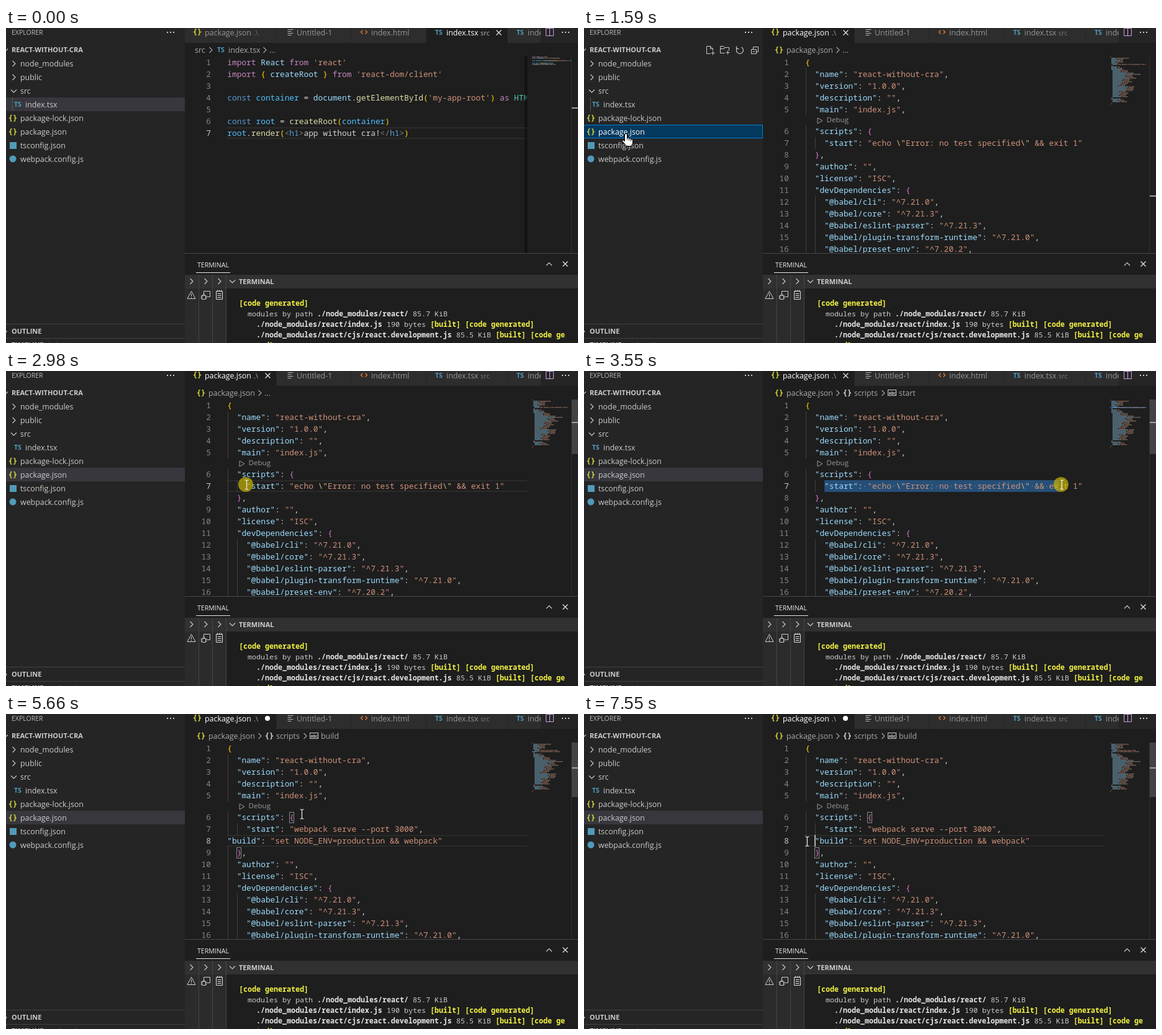
Recreate the animation shown at these times as an HTML page with a canvas. Size 921 by 508 pixels, loop 8000 ms.

```html
<!DOCTYPE html>
<html lang="en">
<head>
<meta charset="utf-8">
<title>Editor walkthrough</title>
<style>
  html, body { margin: 0; width: 100%; height: 100%; overflow: hidden; background: #1e1e1e; }
  canvas { display: block; }
</style>
</head>
<body>
<canvas id="stage" width="921" height="508"></canvas>
<script>
const ctx = document.getElementById('stage').getContext('2d');
const LOOP = 8000;
const UI = '"Open Sans", "Noto Sans", sans-serif';
const MONO = '"Noto Sans Mono", "DejaVu Sans Mono", monospace';
const CODE_X = 356.3, CELL = 7.697, LINE = 19, TOP = 46, LENS = 16;
const YELLOW = '#cbcb41', BLUE = '#519aba', ORANGE = '#e37933', GREY = '#cccccc';

// ---- documents ----
const tsx = [
  "import React from 'react'",
  "import { createRoot } from 'react-dom/client'",
  "",
  "const container = document.getElementById('my-app-root') as HTMLElement",
  "",
  "const root = createRoot(container)",
  "root.render(<h1>app without cra!</h1>)"
];
const dep = s => {
  const [name, version] = s.split(' ');
  return `    "${name}": "^${version}",`;
};
const head = [
  '{', '  "name": "react-without-cra",', '  "version": "1.0.0",', '  "description": "",',
  '  "main": "index.js",', '  "scripts": {'
];
const tail = [
  '  },', '  "author": "",', '  "license": "ISC",', '  "devDependencies": {',
  ...['@babel/cli 7.21.0', '@babel/core 7.21.3', '@babel/eslint-parser 7.21.3',
    '@babel/plugin-transform-runtime 7.21.0', '@babel/preset-env 7.20.2',
    '@babel/preset-react 7.18.6', '@babel/preset-typescript 7.21.0', '@babel/runtime 7.21.0',
    '@types/react 18.0.28', '@types/react-dom 18.0.11', 'babel-loader 9.1.2',
    'css-loader 6.7.3', 'eslint 8.36.0', 'eslint-config-prettier 8.7.0',
    'eslint-plugin-react 7.32.2', 'eslint-webpack-plugin 4.0.0', 'html-webpack-plugin 5.5.0',
    'prettier 2.8.4', 'style-loader 3.3.2', 'typescript 4.9.5', 'webpack 5.76.2',
    'webpack-cli 5.0.1'].map(dep),
  '  },', '  "dependencies": {', dep('react 18.2.0'), dep('react-dom 18.2.0'), '  }', '}'
];
const build = '"build": "set NODE_ENV=production && webpack"';
const before = [...head, '    "start": "echo \\"Error: no test specified\\" && exit 1"', ...tail];
const pasted = [...head, '    "start": "webpack serve --port 3000",', build, ...tail];
const indented = pasted.map(s => s === build ? '  ' + s : s);

const jsonRules = [
  [/"[^"]*"(?=:)/y, '#9cdcfe'], [/\\"/y, '#d7ba7d'],
  [/"[^"\\]*"?|(?<=\\")[^"\\]*"?/y, '#ce9178'], [/[{}]/y, 'brace']
];
const tsxRules = [
  [/'[^']*'/y, '#ce9178'], [/(import|from|as)\b/y, '#c586c0'], [/const\b/y, '#569cd6'],
  [/createRoot(?= })|React|document/y, '#9cdcfe'],
  [/createRoot|getElementById|render/y, '#dcdcaa'], [/container|root/y, '#4fc1ff'],
  [/HTMLElement/y, '#4ec9b0'], [/app without cra!/y, '#d4d4d4'],
  [/<\/?|>/y, '#808080'], [/h1/y, '#569cd6'], [/[{}()]/y, 'brace']
];
const indentOf = s => s.search(/\S|$/);

function tokenize(line, rules) {
  const out = [];
  for (let col = 0; col < line.length;) {
    let text = line[col], color = '#d4d4d4';
    for (const [re, c] of rules) {
      re.lastIndex = col;
      const m = re.exec(line);
      if (m && m[0]) { text = m[0]; color = c; break; }
    }
    if (color === 'brace') color = indentOf(line) ? '#da70d6' : '#ffd700';
    if (text !== ' ') out.push({ text, color, col });
    col += text.length;
  }
  return out;
}
const makeDoc = (lines, rules, json) => ({ lines, json, tokens: lines.map(l => tokenize(l, rules)) });
const docs = {
  tsx: makeDoc(tsx, tsxRules, false), before: makeDoc(before, jsonRules, true),
  pasted: makeDoc(pasted, jsonRules, true), indented: makeDoc(indented, jsonRules, true)
};

// ---- pointer: start time, x, y, kind ----
const pointer = [
  [0, -50, -50, 'arrow'], [330, 905, 402, 'arrow'], [410, 420, 320, 'beam'], [490, 72, 208, 'hand'],
  [660, 70, 203, 'hand'], [740, 69, 191, 'hand'], [820, 68, 173, 'hand'], [990, 67, 170, 'hand'],
  [1670, 82, 168, 'hand'], [1750, 210, 156, 'hand'], [1840, 400, 140, 'beam'], [1920, 481, 135, 'beam'],
  [2080, 474, 140, 'beam'], [2160, 455, 152, 'beam'], [2240, 432, 164, 'beam'],
  [2320, 411, 175, 'beam'], [2400, 397, 182, 'beam'], [2480, 390, 184, 'beam'],
  [2650, 389, 183, 'beam'], [2900, 387, 183, 'beam'], [3060, 405, 183, 'beam'],
  [3140, 445, 183, 'beam'], [3220, 505, 183, 'beam'], [3310, 572, 183, 'beam'],
  [3390, 645, 183, 'beam'], [3470, 715, 183, 'beam'], [3550, 769, 183, 'beam'],
  [3650, 785, 183, 'beam'], [3720, 798, 183, 'beam'], [3800, 810, 183, 'beam'],
  [3900, 817, 183, 'beam'], [4320, 817, 190, 'beam'], [4490, 816, 183, 'beam'],
  [5660, 476, 161, 'beam'], [5740, 444, 183, 'beam'], [5910, 420, 193, 'beam'],
  [5990, 391, 201, 'beam'], [6070, 365, 205, 'beam'], [6150, 350, 203, 'arrow'],
  [6230, 346, 202, 'arrow'], [6710, 352, 203, 'arrow'], [6790, 359, 205, 'beam']
];
const at = (table, t) => table.reduce((hit, row) => row[0] <= t ? row : hit, table[0]);
const within = (t, a, b) => t >= a && t < b;

// ---- drawing helpers ----
function box(x, y, w, h, color) { ctx.fillStyle = color; ctx.fillRect(x, y, w, h); }
function frame(x, y, w, h, color) {
  ctx.strokeStyle = color; ctx.lineWidth = 1;
  ctx.strokeRect(x + .5, y + .5, w - 1, h - 1);
}
function text(s, x, y, color, size = 12.4, weight = 400, family = UI) {
  ctx.font = `${weight} ${size}px ${family}`;
  ctx.fillStyle = color;
  ctx.fillText(s, x, y);
}
const label = (s, x, cy, color, size) => text(s, x, cy + 5, color, size);
const code = (s, x, y, color) => text(s, x, y, color, 12.83, 500, MONO);
function path(d, x, y, color = GREY, fill = null, width = 1) {
  ctx.save();
  ctx.translate(x + .5, y + .5);
  const p = new Path2D(d);
  if (fill) { ctx.fillStyle = fill; ctx.fill(p); }
  ctx.strokeStyle = color; ctx.lineWidth = width;
  ctx.stroke(p);
  ctx.restore();
}
function disc(x, y, r, color) {
  ctx.fillStyle = color;
  ctx.beginPath(); ctx.arc(x, y, r, 0, 7); ctx.fill();
}
const right = (x, y, c) => path('M-2-4.5 2.5 0-2 4.5', x, y, c, null, 1.1);
const down = (x, y, c) => path('M-4.5-2 0 2.5 4.5-2', x, y, c, null, 1.1);
const cross = (x, y) => path('M-4-4 4 4M4-4-4 4', x, y, '#e0e0e0', null, 1.3);
const dots = (x, y) => [-5, 0, 5].forEach(d => box(x + d - 1, y - 1, 2, 2, GREY));
const braces = (x, y, c = YELLOW) =>
  path('M4-5Q2-5 2-3V-1L.5 0 2 1V3Q2 5 4 5M7-5Q9-5 9-3V-1L10.5 0 9 1V3Q9 5 7 5', x, y, c, null, 1.6);
const tsTag = (x, y) => text('TS', x, y + 4, BLUE, 10.5, 700);

function sidebar(t) {
  box(0, 0, 288, 508, '#252526');
  text('EXPLORER', 9, 11, '#bbbbbb', 10.5);
  dots(265, 7);
  down(-2, 35);
  text('REACT-WITHOUT-CRA', 9, 39, '#cccccc', 11, 700);
  if (within(t, 490, 1840)) {
    path('M1 6H-5V-6H1L5-2V1M1-6V-2H5M5 2V8M2 5H8', 202, 35);
    path('M0 5H-7V-6H-2L0-4H7V1M-7-2H-1L1-4M5 1V7M2 4H8', 226, 35);
    path('M-4-3A5.5 5.5 0 1 0 3-4.5M-5-6V-2H-1', 250, 35, GREY, null, 1.2);
    path('M-5-1H3V6H-5ZM-2-1V-5H6V3H3M-3 2.5H1', 274, 35);
  }
  if (t < 1340) box(0, 112, 288, 22, '#37373d');
  if (within(t, 1260, 1340)) box(0, 156, 288, 22, '#2a2d2e');
  if (t >= 1340) box(0, 156, 288, 22, t < 2900 ? '#04395e' : '#37373d');
  if (within(t, 1340, 2900)) frame(-1, 156, 289, 22, '#007fd4');
  if (t < 1920) box(10, 112, 1, 22, '#585858');

  ['node_modules', 'public', 'src', 'index.tsx', 'package-lock.json', 'package.json',
    'tsconfig.json', 'webpack.config.js'].forEach((name, i) => {
    const y = 57 + 22 * i;
    if (i < 2) right(12, y);
    if (i === 2) down(12, y);
    if (i === 3) tsTag(13, y);
    if (i === 4 || i === 5) braces(5, y);
    if (i === 6) box(6, y - 5, 11, 11, BLUE);
    if (i === 7) disc(11, y, 5.5, BLUE);
    label(name, i === 3 ? 31 : 23, y, i === 5 && within(t, 1340, 2900) ? '#ffffff' : '#cccccc');
  });

  box(0, 477, 288, 1, '#414142');
  right(-2, 489);
  text('OUTLINE', 9, 493, '#cccccc', 11, 700);
  box(0, 500, 288, 1, '#414142');
  text('TIMELINE', 9, 515, '#cccccc', 11, 700);
  text(t < 1510 ? 'index.tsx' : 'package.json', 68, 515, '#8f8f8f', 10.5);
}

function tabs(t) {
  const json = t >= 1510;
  const active = json ? 0 : 3;
  const edges = [288, 436, 556, 677, 808, 921];
  box(288, 0, 633, 24, '#252526');
  for (let i = 0; i < 5; i++) {
    box(edges[i], 0, edges[i + 1] - edges[i] - 1, 24, i === active ? '#1e1e1e' : '#2d2d2d');
  }
  const tone = i => i === active ? '#ffffff' : '#969696';
  braces(302, 6);
  label('package.json', 320, 7, tone(0));
  label('.\\', 399, 7, json ? '#b5b5b5' : '#777777', 11);
  path('M-4-4H5M-4-1H2M-4 2H5M-4 5H2', 457, 6, '#b8babb', null, 1.2);
  label('Untitled-1', 468, 7, tone(1));
  path('M-2-3-5 0-2 3M2-3 5 0 2 3', 576, 6, ORANGE, null, 1.4);
  label('index.html', 588, 7, tone(2));
  tsTag(691, 7);
  label('index.tsx', 709, 7, tone(3));
  label('src', 764, 7, json ? '#777777' : '#b5b5b5', 11);
  tsTag(822, 7);
  label('index.tsx', 840, 7, tone(4));
  box(861, 0, 60, 24, '#252526');
  path('M-6-6H6V6H-6ZM0-6V6', 875, 6, '#c9a0dc');
  dots(901, 7);
  if (!json) cross(793, 7);
  else if (t < 4910) cross(421, 7);
  else disc(421, 7, 4, '#ffffff');
}

function crumbs(t) {
  const c = '#a9a9a9';
  if (t < 1510) {
    label('src', 304, 35, c);
    right(329, 35, c);
    tsTag(340, 35);
    label('index.tsx', 358, 35, c);
    right(416, 35, c);
    label('...', 424, 35, c);
    return;
  }
  braces(308, 35);
  label('package.json', 326, 35, c);
  right(408, 35, c);
  if (t < 3140) return label('...', 416, 35, c);
  braces(418, 35, '#cccccc');
  label('scripts', 435, 35, c);
  right(481, 35, c);
  frame(489, 30, 14, 10, '#cccccc');
  text('abc', 490.5, 38, '#cccccc', 6.5, 700);
  label(t < 5240 ? 'start' : 'build', 507, 35, c);
}

const lineTop = (i, json) => TOP + LINE * i + (json && i >= 5 ? LENS : 0);
const colX = col => CODE_X + col * CELL;

function editor(t, mouseX) {
  const doc = t < 1510 ? docs.tsx : t < 4910 ? docs.before : t < 7550 ? docs.pasted : docs.indented;
  const edited = t >= 4910;
  const current = t < 1510 ? 6 : edited ? 7 : t >= 2900 ? 6 : -1;
  const selEnd = within(t, 3060, 4910) ? Math.min(58, Math.floor((mouseX - CODE_X) / CELL)) : 4;

  ctx.save();
  ctx.beginPath(); ctx.rect(288, 46, 551, 317); ctx.clip();
  if (current >= 0 && selEnd <= 4) {
    const y = lineTop(current, doc.json);
    box(355, y, 484, 2, '#2b2b2b');
    box(355, y + 17, 484, 2, '#2b2b2b');
  }
  if (selEnd > 4) box(colX(4), lineTop(6, true), (selEnd - 4) * CELL, LINE, '#264f78');

  doc.lines.slice(0, 17).forEach((line, i) => {
    const y = lineTop(i, doc.json), base = y + 14;
    if (doc.json) {
      for (let col = 0; col < indentOf(line); col += 2) {
        box(Math.round(colX(col) + .4), y, 1, LINE, '#404040');
      }
    }
    ctx.textAlign = 'right';
    code(i + 1, 330, base, i === current ? '#c6c6c6' : '#858585');
    ctx.textAlign = 'left';
    doc.tokens[i].forEach(k => code(k.text, colX(k.col), base, k.color));
    if (i === 6) {
      for (let c = 4; c < selEnd; c++) {
        if (line[c] === ' ') box(colX(c) + 3, y + 9, 1.5, 1.5, '#6f8aa5');
      }
    }
  });

  if (doc.json) {
    path('M-3.5-4.5 4.5 0-3.5 4.5Z', 379, 149, '#999999');
    text('Debug', 390.5, 152, '#999999', 11.6);
  }
  if (edited) {
    frame(456, 158, 8, 18, '#888888');
    frame(371, 215, 8, 18, '#888888');
    const fold = within(t, 6150, 7030) ? Math.min(1, (t - 6070) / 320, (7030 - t) / 320) : 0;
    ctx.globalAlpha = Math.max(0, fold);
    [56, 167, 281].forEach(y => down(346, y));
    ctx.globalAlpha = 1;
    const caret = t >= 7550 ? 2 : t >= 7210 ? 0 : 45;
    const lit = within(t, 4910, 5410) || within(t, 5910, 6410) || t >= 6910;
    if (lit) box(Math.round(colX(caret)) - 1, lineTop(7, true), 2, LINE, '#aeafad');
  }
  if (!doc.json) {
    const g = ctx.createLinearGradient(833, 0, 839, 0);
    g.addColorStop(0, 'rgba(0,0,0,0)');
    g.addColorStop(1, 'rgba(0,0,0,.6)');
    box(833, 46, 6, 317, g);
  }
  ctx.restore();

  if (selEnd > 4) box(847, 58, 58, 2, '#264f78');
  ctx.globalAlpha = .5;
  doc.tokens.forEach((row, i) => row.forEach(({ text: s, color, col }) => {
    [...s].forEach((ch, n) => {
      if (ch !== ' ' && col + n < 63) box(847 + col + n, TOP + 2 * i, 1, 1.4, color);
    });
  }));
  ctx.globalAlpha = 1;
  box(910, 46, 1, 317, '#2f2f2f');
  if (t >= 1840) box(911, 46, 10, 88, '#434343');
  box(911, t < 1510 ? 128 : t < 2900 ? 270 : edited ? 86 : 82, 10, 2, '#a0a0a0');
}

function panel() {
  box(288, 363, 633, 145, '#1e1e1e');
  box(288, 363, 633, 1, '#474747');
  text('TERMINAL', 308, 386, '#e7e7e7', 10.6);
  box(306, 394, 55, 1, '#e7e7e7');
  path('M-4.5 2.5 0-2 4.5 2.5', 874, 380, GREY, null, 1.2);
  cross(900, 380);
  box(288, 398, 633, 22, '#313131');
  box(288, 420, 67, 88, '#2b2b2b');
  [310, 332, 354].forEach(x => box(x, 398, 1, 110, '#454545'));
  [298, 321, 343].forEach(x => right(x, 408));
  path('M0-6 6.5 6H-6.5ZM0-2V2M0 3.5V5', 298, 430);
  path('M-3-1V-6H7V3H2M-6 1H0V7H-6ZM-8 2H-6M-8 5H-6M0 2H2M0 5H2M-5 1-4-1H-2L-1 1', 321, 430);
  path('M-5-6H5V7H-5ZM-3-8V-5M0-8V-5M3-8V-5M-3-2H3M-3 1H3M-3 4H3', 343, 430, '#dddddd');
  down(364, 408);
  text('TERMINAL', 375, 413, '#cccccc', 11, 700);

  const gen = '[code generated]', mod = './node_modules/react/';
  // each part: text, colour key
  [
    [0, [gen, 'y']],
    [2, ['modules by path ', 'n'], [mod, 'b'], [' 85.7 KiB', 'n']],
    [4, [mod + 'index.js', 'b'], [' 190 bytes ', 'n'], ['[built] ' + gen, 'y']],
    [4, [mod + 'cjs/react.development.js', 'b'], [' 85.5 KiB ', 'n'], ['[built] [code ge', 'y']],
    [0, ['nerated]', 'y']]
  ].forEach(([col, ...parts], i) => {
    let x = 375 + col * 7;
    for (const [s, kind] of parts) {
      const color = { y: '#f5f543', n: '#cccccc', b: '#e5e5e5' }[kind];
      text(s, x, 448 + 17 * i, color, 11.667, kind === 'n' ? 500 : 700, MONO);
      x += s.length * 7;
    }
  });
}

function cursor(t, x, y, kind) {
  const pressed = within(t, 2900, 4490) || within(t, 7210, 7280);
  if (pressed) disc(x - 1, y, 12, 'rgba(196,178,8,.72)');
  if (kind === 'beam') {
    path('M-3-7.5H-1L0-6.5 1-7.5H3M0-7V7M-3 7.5H-1L0 6.5 1 7.5H3', x, y, '#f0f0f0', null, 1.2);
  } else if (kind === 'hand') {
    path('M-2 1Q0-1 2 1V7Q4 5 5 8Q7 6 8 9Q11 8 11 11V15Q10 18 8 20H1Q-1 17-6 12Q-6 9-2 12Z',
      x, y, '#000000', '#ffffff');
    path('M2 7V10M5 8V11M8 9V12', x, y, '#000000');
  } else {
    path('M0 0V15L3.5 11.5 6 17 8 16 5.8 10.8H10.5Z', x, y, '#000000', '#ffffff');
  }
}

function draw(t) {
  const [, x, y, kind] = at(pointer, t);
  box(0, 0, 921, 508, '#1e1e1e');
  sidebar(t);
  tabs(t);
  crumbs(t);
  editor(t, x);
  panel();
  cursor(t, x, y, kind);
}

const start = performance.now();
function tick() {
  draw((performance.now() - start) % LOOP);
  requestAnimationFrame(tick);
}
tick();
</script>
</body>
</html>
```
